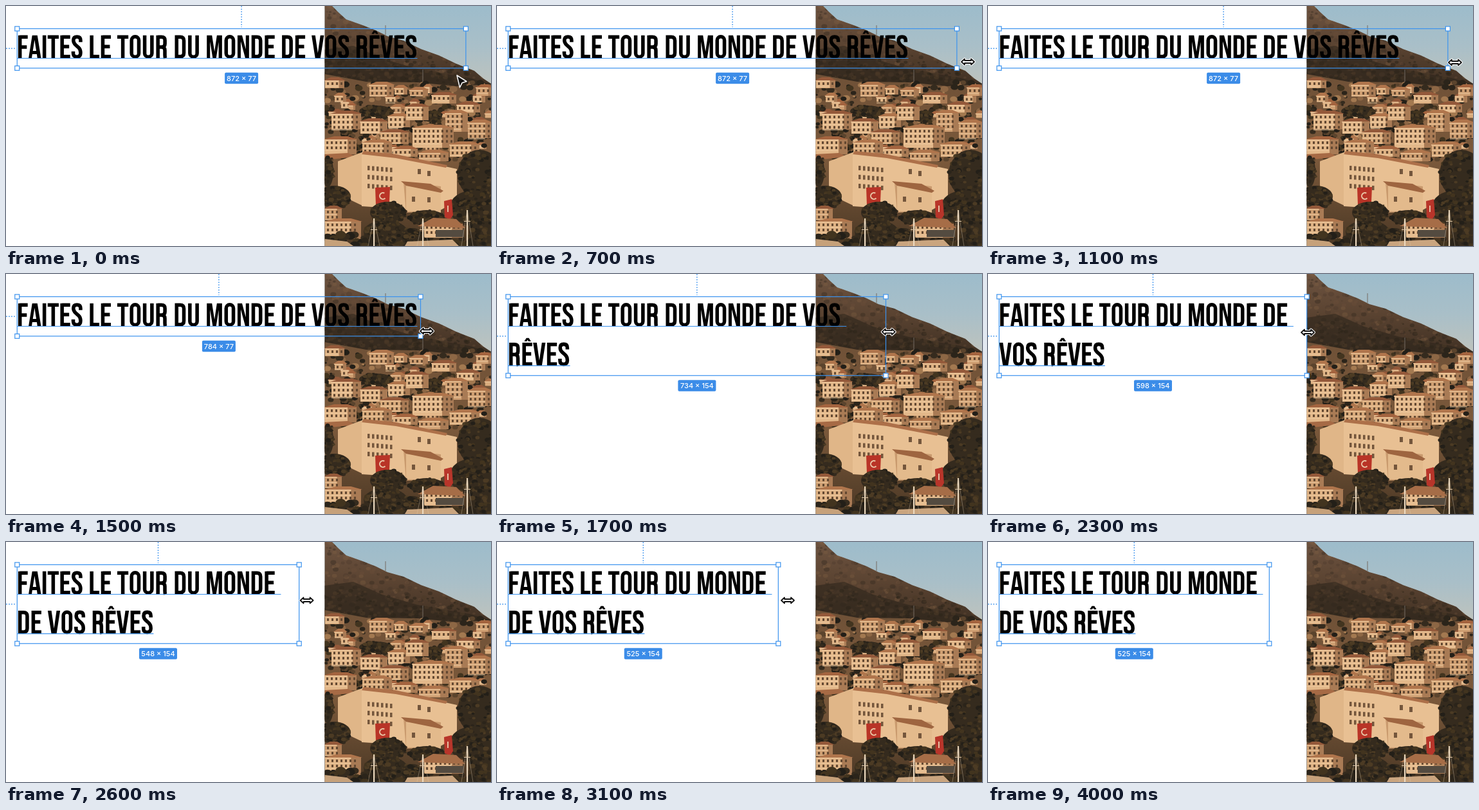
An HTML page with a canvas that plays this animation: 754 px wide and 374 px high, repeating every 4200 ms.

```html
<!DOCTYPE html>
<html lang="fr">
<head>
<meta charset="utf-8">
<title>Titre redimensionné</title>
<style>
html, body { margin: 0; width: 100%; height: 100%; overflow: hidden; background: #fff; }
canvas, svg { position: absolute; left: 0; top: 0; display: block; }
.line { fill: none; stroke: #3a92ee; stroke-width: 1.2; }
.dash { stroke-dasharray: 2 2; }
.handle { fill: #fff; stroke: #3a92ee; stroke-width: 1.2; }
.tag { fill: #3b8ce8; }
.size { fill: #fff; font: 500 11px Inter, "Liberation Sans", sans-serif; text-anchor: middle; }
.stroke { fill: none; stroke: #000; stroke-width: 108; stroke-miterlimit: 8; }
</style>
</head>
<body>
<canvas id="photo" width="754" height="374"></canvas>
<svg id="stage" width="754" height="374" viewBox="0 0 754 374">
  <g id="title" role="img"></g>
  <g id="frame"></g>
  <path id="arrow" d="M0 0L15 9.5L8 11.8L4.5 19Z" fill="#111" stroke="#fff" stroke-width="1.5" stroke-linejoin="round"/>
  <g id="resize" stroke-linejoin="round">
    <path d="M-10 0L-5-4.5V-2H5V-4.5L10 0L5 4.5V2H-5V4.5Z" fill="none" stroke="#fff" stroke-width="4"/>
    <path d="M-10 0L-5-4.5V-2H5V-4.5L10 0L5 4.5V2H-5V4.5Z" fill="#fff" stroke="#111" stroke-width="1.8"/>
  </g>
</svg>
<script>
const $ = id => document.getElementById(id);

// ---- Condensed lettering: [advance, stroked path, filled path], 1000 units per em
const barsE = "M92-700V0M92-648H337M92-358H306M92-52H337";
const glyphs = {
  " ": [168],
  A: [402, "", "M12 0L123-700H280L392 0H281L262-127H126L107 0ZM142-222H246L194-560Z"],
  D: [404, "M92-648H205Q312-648 312-535V-165Q312-52 205-52H92Z"],
  E: [354, barsE],
  "Ê": [354, barsE, "M95-742L160-842H235L300-742H222L197-790L172-742Z"],
  F: [341, "M92-700V0M92-648H327M92-342H300"],
  I: [180, "M90-700V0"],
  L: [338, "M92-700V0M92-52H324"],
  M: [536, "", "M37 0V-700H193L270-205L343-700H499V0H396V-500L320 0H217L135-507V0Z"],
  N: [424, "", "M37 0V-700H175L288-275V-700H387V0H274L135-515V0Z"],
  O: [396, "M88-547A110 110 0 0 1 308-547V-153A110 110 0 0 1 88-153Z"],
  R: [400, "M92-700V0M92-648H200Q305-648 305-548V-440Q305-342 205-342H92M205-342Q303-342 303-240V-100Q303-30 318 0"],
  S: [376, "M300-495V-545Q300-655 190-655Q82-655 82-545Q82-465 150-405L235-330Q300-270 300-165Q300-45 188-45Q76-45 76-155V-212"],
  T: [356, "M178-700V0M10-648H346"],
  U: [400, "M90-700V-153A110 110 0 0 0 310-153V-700"],
  V: [396, "", "M10-700H121L200-160L277-700H386L277 0H121Z"]
};
const words = "FAITES LE TOUR DU MONDE DE VOS RÊVES".split(" ");
const em = 51.2, zoom = 0.8, left = 17.3, top0 = 35.4, lineHeight = em * 1.2;
const measure = s => [...s].reduce((sum, c) => sum + glyphs[c][0], 0) * em / 1000;

function wrap(width) {
  const lines = [""];
  for (const word of words) {
    const last = lines.length - 1;
    const joined = lines[last] ? lines[last] + " " + word : word;
    if (measure(joined) > width) lines.push(word);
    else lines[last] = joined;
  }
  return lines;
}

function lettering(text, x, y) {
  let pen = 0, out = "";
  for (const c of text) {
    const [advance, stroke, fill] = glyphs[c];
    if (stroke) out += `<path class="stroke" transform="translate(${pen})" d="${stroke}"/>`;
    if (fill) out += `<path fill-rule="evenodd" transform="translate(${pen})" d="${fill}"/>`;
    pen += advance;
  }
  return `<g transform="translate(${x} ${y}) scale(${em / 1000})">${out}</g>`;
}

// ---- Selection box, guides and size label
function drawBox(units) {
  const width = units * zoom, lines = wrap(width);
  const height = lines.length * lineHeight, right = left + width, bottom = top0 + height;
  const midX = left + width / 2, midY = top0 + height / 2;
  const label = `${units} × ${lines.length * 77}`;
  const tagWidth = 52 + 7 * (label.length - 8);
  const baseline = i => top0 + em * 0.9 + i * lineHeight;

  $("title").setAttribute("aria-label", lines.join(" "));
  $("title").innerHTML = lines.map((s, i) => lettering(s, left - 0.3, baseline(i))).join("");

  const under = lines.map((s, i) => {
    const end = i < lines.length - 1 ? Math.min(measure(s + " "), width) : measure(s);
    return `<path class="line" d="M${left} ${baseline(i)}h${end}"/>`;
  }).join("");
  const handles = [[left, top0], [right, top0], [left, bottom], [right, bottom]]
    .map(([x, y]) => `<rect class="handle" x="${x - 3.5}" y="${y - 3.5}" width="7" height="7"/>`).join("");
  $("frame").innerHTML = under +
    `<path class="line dash" d="M${midX} 0V33M0 ${midY}H15"/>
     <rect class="line" x="${left}" y="${top0}" width="${width}" height="${height}"/>${handles}
     <rect class="tag" x="${midX - tagWidth / 2}" y="${bottom + 7}" width="${tagWidth}" height="17.5" rx="2"/>
     <text class="size" x="${midX}" y="${bottom + 20}">${label}</text>`;
}

// ---- Motion tables: [ms, value...]
const widths = [[0, 872], [1100, 872], [1500, 784], [2000, 660], [2300, 598], [2600, 548], [2800, 525]];
const arrowPath = [[0, 701, 108], [200, 701, 108], [500, 716, 92]];
const resizePath = [[500, 725, 89], [700, 732, 87], [1100, 726, 88], [1500, 654, 89], [2000, 541, 92],
  [2300, 497, 91], [2800, 448, 91], [3100, 452, 91]];

function sample(table, t) {
  const next = table.findIndex(row => row[0] > t);
  if (next < 0) return table[table.length - 1].slice(1);
  if (next === 0) return table[0].slice(1);
  const a = table[next - 1], b = table[next], k = (t - a[0]) / (b[0] - a[0]);
  return a.slice(1).map((v, i) => v + (b[i + 1] - v) * k);
}

function place(id, visible, [x, y]) {
  $(id).setAttribute("visibility", visible ? "visible" : "hidden");
  $(id).setAttribute("transform", `translate(${x} ${y})`);
}

const start = performance.now();
let shown = -1, shownWidth = 0;
function tick() {
  const t = Math.floor((performance.now() - start) % 4200 / 100) * 100;
  if (t !== shown) {
    shown = t;
    const units = Math.round(sample(widths, t)[0]);
    if (units !== shownWidth) drawBox(shownWidth = units);
    place("arrow", t < 500, sample(arrowPath, t));
    place("resize", t >= 500 && t < 3400, sample(resizePath, t));
  }
  requestAnimationFrame(tick);
}

// ---- Hillside town, drawn once
function drawPhoto() {
  const c = $("photo").getContext("2d");
  let seed = 11;
  const rnd = () => (seed = (seed * 16807) % 2147483647) / 2147483647;
  const pick = list => list[Math.floor(rnd() * list.length)];
  const rect = (color, x, y, w, h) => { c.fillStyle = color; c.fillRect(x, y, w, h); };
  const trace = pts => { c.beginPath(); pts.forEach(p => c.lineTo(...p)); c.closePath(); };
  const poly = (color, ...pts) => { trace(pts); c.fillStyle = color; c.fill(); };
  const fade = (y0, y1, ...colors) => {
    const g = c.createLinearGradient(0, y0, 0, y1);
    colors.forEach((color, i) => g.addColorStop(i / (colors.length - 1), color));
    return g;
  };
  const leaves = ["#2b241a", "#352b1e", "#42341f", "#231f18"];
  const speckle = (x, y, w, h, n, size, colors) => {
    for (let i = 0; i < n; i++) {
      const r = size * (0.4 + rnd());
      c.fillStyle = pick(colors);
      c.beginPath();
      c.ellipse(x + rnd() * w, y + rnd() * h, r * 1.3, r, 0, 0, 7);
      c.fill();
    }
  };
  const tree = (x, y, rx, ry) => {
    c.save();
    c.beginPath();
    c.ellipse(x, y, rx, ry, 0, 0, 7);
    c.fillStyle = leaves[1];
    c.fill();
    c.restore();
    for (let i = 0; i < rx * 3; i++) {
      const a = rnd() * 6.28, d = Math.sqrt(rnd());
      speckle(x + Math.cos(a) * rx * d, y + Math.sin(a) * ry * d, 2, 2, 1, 2.6, [...leaves, "#4c3b24"]);
    }
  };
  const house = (x, y, w, h) => {
    const wall = pick(["#d9ab7c", "#e3b88a", "#cf9f72", "#dfb385"]);
    rect(wall, x, y + 4, w, h - 4);
    rect("#a97b55", x + w * 0.72, y + 4, w * 0.28, h - 4);
    poly(pick(["#a4643f", "#b0754c", "#94593a"]), [x - 2, y + 5], [x + w * 0.3, y], [x + w * 0.72, y], [x + w + 2, y + 5]);
    rect("#edc89c", x - 1, y + 5, w * 0.74, 1.2);
    for (let wy = y + 8; wy < y + h - 4; wy += 8) {
      for (let wx = x + 3; wx < x + w - 4; wx += 7) rect("#644932", wx, wy, 3, 4);
      rect("#efcda3", x, wy + 5.5, w * 0.7, 1);
    }
  };

  c.beginPath();
  c.rect(495.5, 0, 258.5, 374);
  c.clip();
  rect(fade(0, 125, "#9dbccb", "#a9bfc8", "#bfc3bd"), 495, 0, 259, 374);

  const ridge = [[495, 0], [507, 0], [517, 10], [529, 21], [552, 29], [575, 38], [593, 47], [618, 54],
    [645, 67], [673, 77], [700, 90], [728, 101], [742, 113], [754, 121], [754, 150], [495, 150]];
  c.save();
  trace(ridge);
  c.clip();
  rect(fade(0, 125, "#6d5340", "#5a4331", "#3f3023"), 495, 0, 259, 150);
  speckle(495, 0, 259, 125, 420, 2.6, ["#4a382a55", "#33281e66", "#80604455", "#6c503a55"]);
  poly("#2e251b99", [495, 68], [540, 62], [585, 82], [640, 98], [720, 112], [754, 122], [754, 150], [495, 150]);
  speckle(495, 75, 230, 45, 160, 2.4, ["#2c241a88", "#4d3a2888"]);
  c.restore();
  rect("#746a62", 589.5, 30, 1, 15);
  rect("#746a62", 647.5, 99, 1, 22);

  poly(fade(108, 374, "#6f5137", "#7b593b", "#4b3825"), [495, 106], [560, 118], [640, 119], [700, 125], [754, 122], [754, 374], [495, 374]);
  speckle(495, 118, 259, 125, 330, 3.6, [...leaves, "#8d6745", "#5b442d", "#a37950"]);
  for (let i = 0; i < 34; i++) house(497 + rnd() * 248, 120 + rnd() * 96, 10 + rnd() * 12, 9 + rnd() * 6);
  speckle(495, 135, 259, 90, 80, 3.5, leaves);
  tree(575, 164, 26, 9);
  tree(662, 172, 16, 9);
  tree(606, 206, 20, 9);

  [[496, 111, 30, 17], [511, 135, 18, 14], [565, 118, 38, 23], [604, 123, 20, 15], [628, 126, 28, 14],
   [662, 134, 38, 18], [731, 122, 26, 18], [701, 149, 36, 17], [506, 163, 46, 29], [551, 175, 42, 24],
   [594, 167, 34, 22], [622, 152, 35, 26], [683, 162, 35, 34], [718, 177, 38, 29], [632, 185, 64, 36],
   [582, 192, 44, 23], [495, 203, 50, 28], [554, 208, 46, 22], [602, 218, 38, 17], [690, 211, 46, 24],
   [642, 224, 46, 18]].forEach(h => house(...h));
  poly("#a66a45", [495, 231], [532, 229], [544, 235], [495, 240]);
  tree(500, 258, 9, 24);

  // Long pale building
  poly("#e0b688", [516, 242], [556, 227], [556, 312], [516, 293]);
  poly("#e8c093", [553, 229], [606, 233], [701, 254], [701, 304], [672, 320], [553, 312]);
  poly("#ad7049", [556, 226], [606, 231], [686, 248], [684, 252], [606, 237], [553, 231]);
  poly("#c99a6e", [618, 275], [676, 281], [676, 320], [622, 322]);
  poly("#e3ba8c", [622, 280], [676, 288], [676, 322], [622, 320]);
  poly("#9e6540", [614, 273], [660, 277], [680, 288], [676, 291], [622, 280]);
  for (let row = 0; row < 3; row++)
    for (let col = 0; col < 6; col++) rect("#74563c", 562 + col * 7, 249 + row * 14 + col * 0.6, 3.5, 7);
  [[640, 254], [655, 257], [631, 297], [655, 298]].forEach(([x, y]) => rect("#74563c", x, y, 5, 8));

  // Flags
  poly("#b93427", [574, 283], [597, 282], [596, 305], [588, 309], [575, 311]);
  c.lineWidth = 2;
  c.strokeStyle = "#e9c4a4";
  c.beginPath();
  c.arc(586, 296, 5, 0.8, 5.2);
  c.stroke();

  // Foreground trees, roofs and masts
  tree(736, 262, 34, 38);
  tree(727, 315, 38, 28);
  tree(510, 297, 26, 17);
  tree(594, 322, 28, 17);
  tree(654, 330, 28, 12);
  poly("#b8352a", [681, 304], [693, 301], [695, 326], [690, 333], [682, 329]);
  rect("#e5bea0", 686, 311, 2, 10);
  house(496, 311, 26, 22);
  house(496, 331, 56, 32);
  speckle(495, 356, 259, 20, 130, 5, leaves);
  tree(590, 352, 34, 18);
  house(650, 335, 60, 26);
  poly("#a66d47", [640, 343], [664, 330], [700, 332], [714, 346]);
  rect("#544b40", 668, 349, 44, 11);
  tree(740, 350, 20, 20);
  tree(632, 360, 17, 14);
  poly("#c6a17a", [495, 363], [530, 367], [540, 374], [495, 374]);
  poly("#caa57f", [624, 367], [694, 364], [704, 374], [620, 374]);
  [[572, 331], [648, 331], [717, 318]].forEach(([x, y]) => {
    rect("#ecd9bf", x - 1, y, 2.2, 374 - y);
    rect("#dcc4a5", x - 5, y + 17, 10, 1);
    c.lineWidth = 0.7;
    c.strokeStyle = "#d9c3a799";
    c.beginPath();
    c.moveTo(x - 9, 374);
    c.lineTo(x, y);
    c.lineTo(x + 9, 374);
    c.stroke();
  });
}

drawPhoto();
tick();
</script>
</body>
</html>
```
